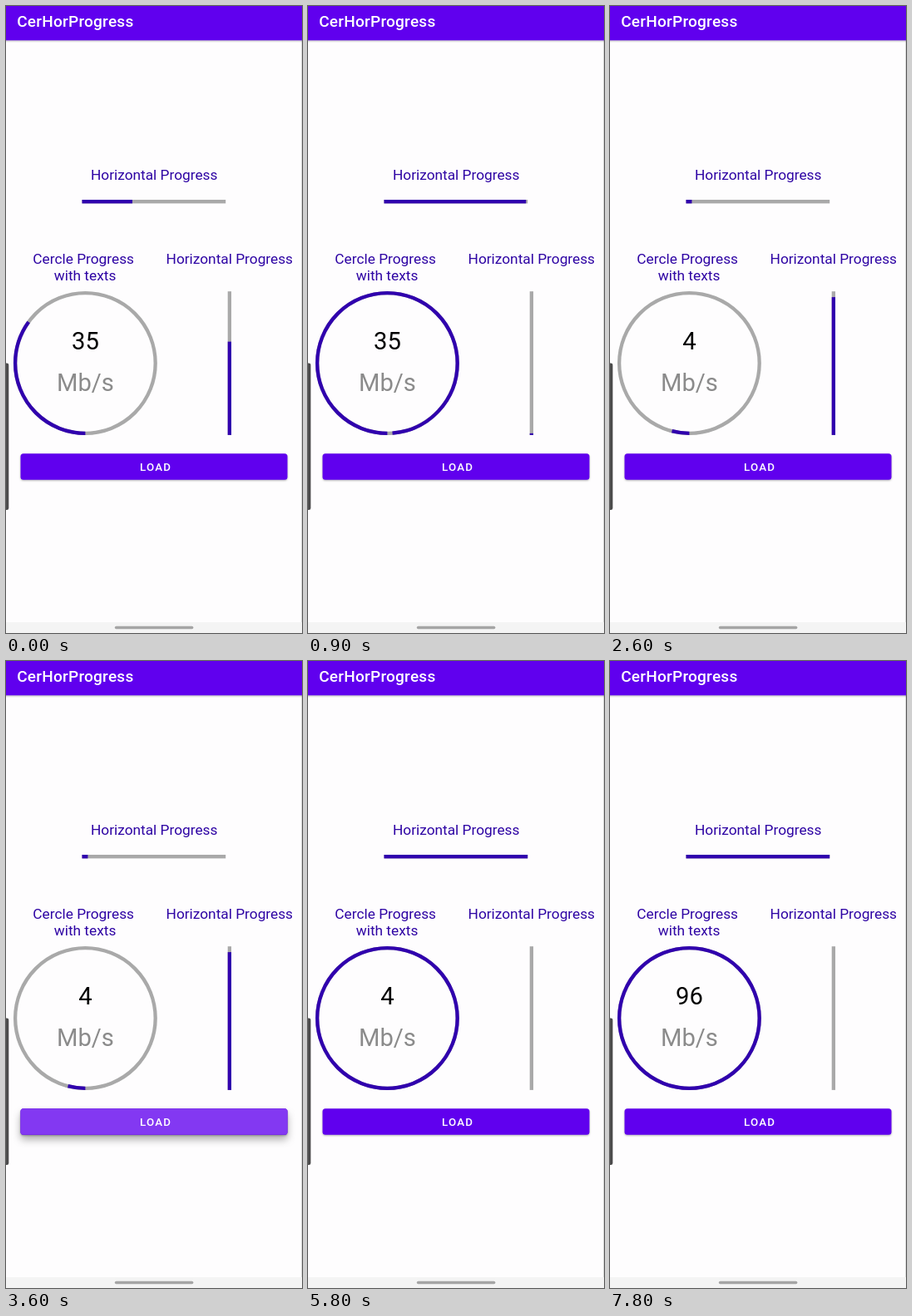
Recreate the animation shown at these times as an HTML page. Size 356 by 754 pixels, loop 8 s.

```html
<!DOCTYPE html>
<html lang="en">
<head>
<meta charset="utf-8">
<title>Progress</title>
<style>
  html, body { margin: 0; width: 100%; height: 100%; overflow: hidden; background: #fefdfe; }
  svg { display: block; width: 356px; height: 754px; font-family: Roboto, sans-serif; }
  .label { font-size: 17.3px; fill: #2e04a4; text-anchor: middle; }
  .big { font-size: 29.2px; text-anchor: middle; }
  .track { fill: #a9a9a9; }
  .fill { fill: #3000ae; }
  .ring { fill: none; stroke-width: 4.3; }
  #low { filter: drop-shadow(0 1.5px 1.2px rgba(0, 0, 0, .3)); }
  #high { filter: drop-shadow(0 6px 5px rgba(0, 0, 0, .3)); }
</style>
</head>
<body>
<svg viewBox="0 0 356 754">
  <defs>
    <clipPath id="clip"><rect x="17.5" y="538.3" width="321" height="31.5" rx="3.5"/></clipPath>
    <linearGradient id="shade" x2="0" y2="1">
      <stop stop-color="#000" stop-opacity=".24"/>
      <stop offset="1" stop-color="#000" stop-opacity="0"/>
    </linearGradient>
  </defs>
  <rect width="356" height="754" fill="#fefdfe"/>
  <rect x="355" y="41" width="1" height="700" fill="#dedede"/>
  <rect y="41" width="356" height="3" fill="url(#shade)"/>
  <rect width="356" height="41.3" fill="#6000ee"/>
  <text x="13.2" y="25" font-size="19.05" font-weight="500" letter-spacing=".24" fill="#fff">CerHorProgress</text>

  <text class="label" x="178.2" y="209">Horizontal Progress</text>
  <rect class="track" x="91.5" y="233" width="172.7" height="4.4"/>
  <rect class="fill" id="bar" x="91.5" y="233" height="4.4"/>

  <text class="label" x="93.2" y="309.6">Cercle Progress</text>
  <text class="label" x="95" y="329.6">with texts</text>
  <circle class="ring" cx="95.4" cy="429.5" r="84.3" stroke="#a9a9a9"/>
  <circle class="ring" id="arc" cx="95.4" cy="429.5" r="84.3" stroke="#3000ae"
    pathLength="100" transform="rotate(90 95.4 429.5)"/>
  <text class="big" id="num" x="95.4" y="412.6" fill="#000"></text>
  <text class="big" x="95.4" y="463.2" fill="#8b8b8b">Mb/s</text>

  <text class="label" x="268.8" y="309.6">Horizontal Progress</text>
  <rect class="track" x="266.7" y="343.2" width="4.3" height="172.7"/>
  <rect class="fill" id="column" x="266.7" width="4.3"/>

  <rect id="high" x="17.5" y="538.3" width="321" height="31.5" rx="3.5" fill="#6000ee"/>
  <rect id="low" x="17.5" y="538.3" width="321" height="31.5" rx="3.5" fill="#6000ee"/>
  <g clip-path="url(#clip)"><circle id="ripple" cy="554" fill="#fff"/></g>
  <text x="161" y="559" font-size="13.3" font-weight="500" letter-spacing="1.19" fill="#fff">LOAD</text>

  <path d="M0 429.5h1a2.3 2.3 0 0 1 2.3 2.3v172a2.3 2.3 0 0 1-2.3 2.3h-1z" fill="#4c4c4c"/>
  <rect y="741" width="356" height="13" fill="#f4f4f4"/>
  <rect x="130.8" y="745.7" width="94.6" height="3.6" rx="1.8" fill="#a5a5a5"/>
</svg>
<script>
const LOOP = 8000, STEP = 100, RUN = 930, SIZE = 172.7;

// Each entry: time, start value, end value, shown number
const runs = [
  [50, 35, 100, 35],
  [2000, 4, 4, 4],
  [3620, 4, 100, 4],
  [6610, 96, 100, 96]
];
// Touch down and touch up
const presses = [[30, 200], [1900, 2020], [3350, 3620], [6601, 6800]];

const $ = id => document.getElementById(id);
const clamp = x => Math.min(1, Math.max(0, x));
const mix = (a, b, k) => a + (b - a) * k;
const set = (id, attrs) => {
  for (const name in attrs) $(id).setAttribute(name, attrs[name]);
};

function drawProgress(t) {
  const [start, from, to, number] = runs.filter(r => r[0] <= t).pop() || runs[0];
  const k = (1 - Math.cos(Math.PI * clamp((t - start) / RUN))) / 2;
  const value = mix(from, to, k), rest = SIZE * (1 - value / 100);
  set('bar', { width: SIZE - rest });
  set('column', { y: 343.2 + SIZE - rest, height: rest });
  set('arc', { 'stroke-dasharray': value >= 100 ? 'none' : `${value} 100` });
  $('num').textContent = number;
}

function drawButton(t) {
  const [down, up] = presses.filter(p => p[0] <= t).pop() || [t, t];
  const grow = 1 - (1 - clamp((t - down) / 225)) ** 3;
  const fade = 1 - clamp((t - up) / 380);
  const lift = clamp((t - down) / 100) * (1 - clamp((t - up - 50) / 250));
  set('ripple', {
    cx: mix(268, 178, grow),
    r: mix(45, 165, grow),
    opacity: 0.22 * clamp((t - down) / 75) * fade
  });
  set('high', { opacity: lift });
}

function frame(now) {
  const t = Math.floor(now % LOOP / STEP) * STEP;
  drawProgress(t);
  drawButton(t);
  requestAnimationFrame(time => frame(time - origin));
}
const origin = performance.now();
frame(0);
</script>
</body>
</html>
```
